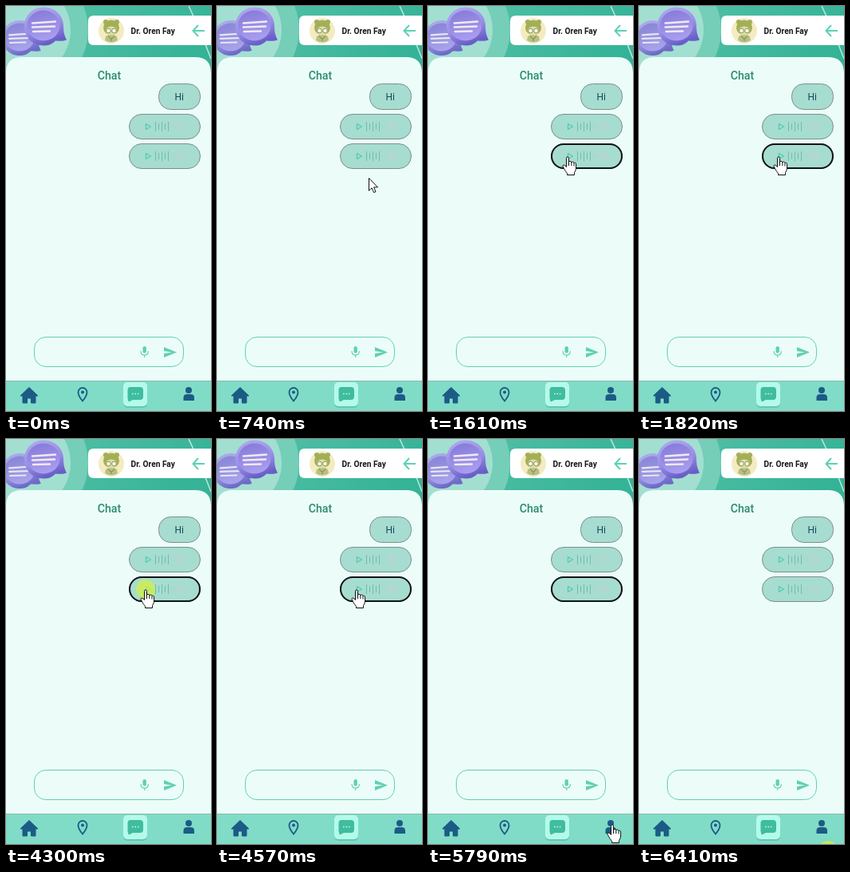
An HTML page for the animation above (6.61 s loop, 257 by 507 pixels).

```html
<!DOCTYPE html>
<html lang="en">
<head>
<meta charset="utf-8">
<title>Chat</title>
<style>
html, body { margin: 0; width: 100%; height: 100%; overflow: hidden; background: #ecfdf9; }
svg { display: block; width: 257px; height: 507px; font-family: Roboto, "Liberation Sans", sans-serif; }
</style>
</head>
<body>
<svg viewBox="0 0 257 507">
  <defs>
    <linearGradient id="sky" x2="1" y2="0.3">
      <stop offset="0" stop-color="#58c3aa"/><stop offset="1" stop-color="#35b397"/>
    </linearGradient>
    <linearGradient id="rim" x2="0.4" y2="1">
      <stop offset="0" stop-color="#b3aaf0"/><stop offset="0.6" stop-color="#9a90e6"/><stop offset="1" stop-color="#695ec6"/>
    </linearGradient>
    <linearGradient id="face" x2="0.3" y2="1">
      <stop offset="0" stop-color="#8378d6"/><stop offset="1" stop-color="#a79cee"/>
    </linearGradient>
    <g id="balloon">
      <path d="M-1-24C14-24 24-13 24-1C24 7 25 11 28 17C23 19 18 18 14 18C9 23 5 24-1 24C-15 24-25 13-25 0S-15-24-1-24Z" fill="url(#rim)"/>
      <ellipse cx="-1" cy="-1" rx="20.500" ry="19" fill="url(#face)"/>
      <path d="M-15-4L14-6M-15 1L13 0M-14 6.500L7 6" stroke="#f0e9f3" stroke-width="2.4" stroke-linecap="round"/>
    </g>
    <g id="voice">
      <rect x=".5" y=".5" width="89" height="31" rx="15.5" fill="#a6ddd0" stroke="#7d8f88"/>
      <path d="M21.5 12.5V19.5L27.5 16Z" fill="none" stroke="#55ceb0" stroke-width="1.4" stroke-linejoin="round"/>
      <path d="M33.5 10V22M37.5 12V20M41.5 10V22M45.5 12V20M49.5 10V22" stroke="#6fbcaa"/>
      <path d="M53.5 14V18M57.5 14V18" stroke="#b4cfca"/>
      <path d="M61.5 12V20M64.5 10V22M68.5 11V21" stroke="#d0cbd0"/>
    </g>
    <path id="arrow" d="M.5.5V16.2L4.1 12.8L6.6 18.5L9 17.5L6.6 11.9H11.5Z"/>
    <g id="hand">
      <path d="M-1.500 13V2.500Q-1.500.800 0 .800T1.500 2.500V7.500Q1.700 6.300 3.100 6.300T4.800 8Q5 7 6.400 7T8 8.800Q8.300 8 9.400 8.200T10.600 10V15Q10.600 17.500 8.500 20.500V23.500H-.500V21.500Q-3 18.500-4.500 15.500L-6 12.800Q-6.300 11-4.700 11Q-3.300 11-1.500 13.500Z"/>
      <path d="M1.500 7V12M4.800 8V12M8 9V12.500" fill="none"/>
    </g>
  </defs>

  <rect width="257" height="100" fill="url(#sky)"/>
  <circle cx="23" cy="30" r="80" fill="#74ceb8"/>
  <circle cx="22" cy="30" r="59" fill="#a2dfd1"/>
  <path d="M229 0Q242 27 257 66" fill="none" stroke="#b9e9dc" stroke-width="1.5"/>
  <use href="#balloon" transform="translate(18 40) scale(.92)" opacity=".9"/>
  <use href="#balloon" x="48" y="25.500"/>

  <path d="M257 12H110Q103 12 103 19V42Q103 49 110 49H257Z" fill="#fff"/>
  <circle cx="132" cy="31" r="16" fill="#f4ecc0"/>
  <g fill="#a3af58">
    <circle cx="125" cy="20" r="3"/><circle cx="139" cy="20" r="3"/>
    <ellipse cx="132" cy="27" rx="10" ry="9.500"/>
    <path d="M125 38Q132 34 139 38L140 43Q132 48 124 43Z" fill="#b9bf83"/>
  </g>
  <ellipse cx="132" cy="31" rx="7" ry="5.500" fill="#dfdda6"/>
  <g fill="#fffdf0" stroke="#87924b"><circle cx="128.5" cy="31" r="2.8"/><circle cx="135.5" cy="31" r="2.8"/></g>
  <path d="M128 37Q132 45 136 37M132 41V44" fill="none" stroke="#7d8850"/>
  <text x="156.500" y="35" font-size="10.2" font-weight="700" fill="#15181a">Dr. Oren Fay</text>
  <path d="M249 31H235M241 24L234.5 31L241 38" fill="none" stroke="#5bd2b5" stroke-width="2"/>

  <path d="M0 507V84Q0 64 20 64H237Q257 64 257 84V507Z" fill="#ecfdf9"/>
  <text x="129.5" y="92" font-size="14.2" font-weight="500" text-anchor="middle" fill="#2b8b6d">Chat</text>
  <rect x="191.5" y="97.5" width="52" height="32" rx="15" fill="#a6ddd0" stroke="#7d8f88"/>
  <text x="217.2" y="118" font-size="12" text-anchor="middle" fill="#174a5e">Hi</text>
  <use href="#voice" x="154" y="135"/>
  <use href="#voice" x="154" y="172"/>
  <rect id="focus" x="155" y="173" width="88" height="30" rx="15" fill="none" stroke="#101414" stroke-width="2"/>

  <rect x="35.5" y="414.5" width="187" height="37" rx="14.5" fill="none" stroke="#62d0b4"/>
  <g fill="#62cfb3">
    <rect x="171.5" y="426" width="4.4" height="8.5" rx="2.2"/>
    <path d="M169 432Q169 437 173.7 437T178.4 432M173.7 437V440" fill="none" stroke="#62cfb3" stroke-width="1.2"/>
    <path d="M198 427L214 433.5L198 440V435L208 433.5L198 432Z"/>
  </g>

  <rect y="469" width="257" height="38" fill="#80dcc7"/>
  <path d="M0 469.5H257" stroke="#86b8aa"/>
  <path d="M18 488L29 477.5L40 488H37V497H31.5V491H26.5V497H21V488Z" fill="#1c5b85" stroke="#1c5b85" stroke-linejoin="round"/>
  <path d="M96 494.5Q90.5 488 90.5 483.5A5.5 5.5 0 0 1 101.5 483.5Q101.5 488 96 494.5Z" fill="none" stroke="#1c5b85" stroke-width="1.8"/>
  <circle cx="96" cy="483.5" r="2" fill="#1c5b85"/>
  <rect x="147" y="473" width="30" height="30" rx="5" fill="#59b7a0" opacity=".6"/>
  <rect x="147" y="471" width="30" height="30" rx="5" fill="#b4faea"/>
  <path d="M156 477H168Q172 477 172 481V489Q172 493 168 493H159L154 495.5Q153 494 152.5 491V481Q152.5 477 156 477Z" fill="#40bc9f"/>
  <path d="M158 485.5H166.5" stroke="#c9f7eb" stroke-width="1.6" stroke-dasharray="1.6 1.8"/>
  <circle cx="229" cy="481" r="4" fill="#1c5b85"/>
  <path d="M222.5 494V490Q222.5 486 227 486H231.5Q236 486 236 490V494Z" fill="#1c5b85"/>

  <circle id="press" r="12" fill="#d8f03a" opacity=".7"/>
  <use id="cursor" fill="#fff" stroke="#111" stroke-linejoin="round"/>
</svg>
<script>
const LOOP = 6610;
// begin ms, end ms, steps, destination x, y
const moves = [
  [270, 400, 3, 195, 224],
  [670, 1010, 6, 175, 188],
  [4910, 5250, 6, 228, 414],
  [5580, 5790, 4, 231, 482],
  [5860, 6080, 4, 237, 515]
];
const clicks = [[1270, 1480], [4300, 4510], [6410, LOOP]];
const [focusRing, press, cursor] = ["focus", "press", "cursor"].map(id => document.getElementById(id));
const show = (el, on) => el.setAttribute("visibility", on ? "visible" : "hidden");
const place = (el, x, y) => el.setAttribute("transform", `translate(${x} ${y})`);
const ease = p => p * p * (3 - 2 * p);

function pointer(t) {
  let x = 230, y = 355;
  for (const [begin, end, steps, toX, toY] of moves) {
    if (t < begin) break;
    const step = Math.floor((t - begin) / (end - begin) * (steps - 1) + 1.001);
    const p = ease(Math.min(1, step / steps));
    x += (toX - x) * p;
    y += (toY - y) * p;
  }
  return [Math.round(x), Math.round(y)];
}

function draw(now) {
  const t = now % LOOP;
  const [x, y] = pointer(t);
  const overButton = x > 154 && y > 171 && y < 208 || x > 220 && y > 474 && y < 500;
  cursor.setAttribute("href", overButton ? "#hand" : "#arrow");
  place(cursor, x, y);
  place(press, x, y);
  show(cursor, t >= 270);
  show(press, clicks.some(([from, to]) => t >= from && t < to));
  show(focusRing, t >= 1270 && t < 6410);
}

const start = performance.now();
function tick() {
  draw(performance.now() - start);
  requestAnimationFrame(tick);
}
tick();
</script>
</body>
</html>
```
